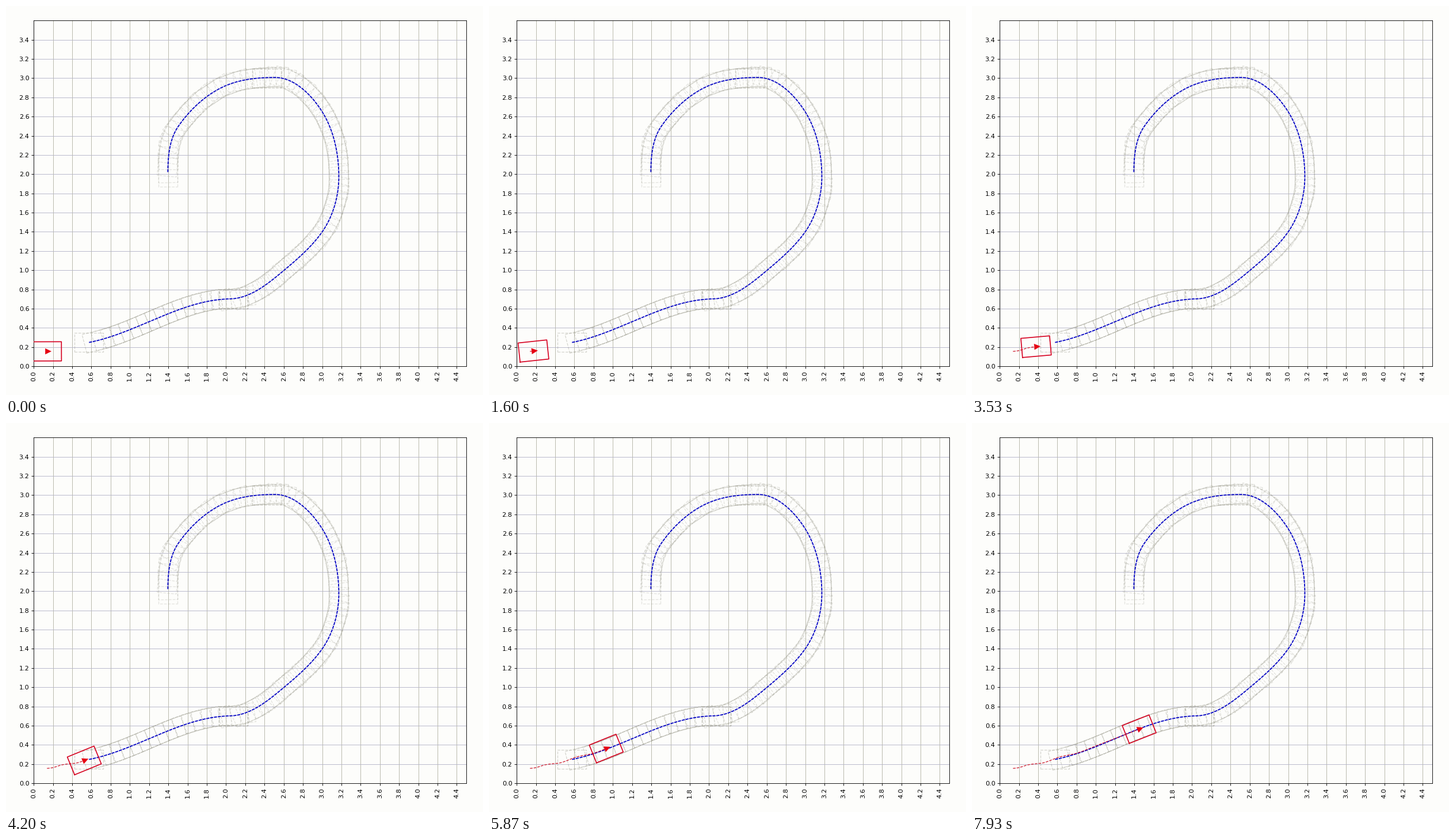
A matplotlib script for the animation above (8 s loop, 829 px wide and 676 px high).

```python
import numpy as np
import matplotlib.pyplot as plt
from matplotlib.animation import FuncAnimation
from matplotlib.collections import LineCollection

W, H, DPI = 829, 676, 80
FRAMES, LOOP_MS = 120, 8000
CAR_L, CAR_W = 0.3, 0.2
PAPER = "#fdfdfb"

# Key poses: x, y, heading in degrees
ROUTE = [(.575, .249, 11), (2.04, .702, 1), (2.6, .997, 40), (3.0, 1.4, 55),
         (3.173, 1.974, 90), (3.0, 2.65, 122), (2.51, 3.007, 180),
         (2.0, 2.923, 203), (1.505, 2.501, 235), (1.395, 2.022, 270)]
DRIVE = [(.138, .156, 0), (.177, .16, 5), (.288, .191, 13), (.41, .207, 3),
         (.6, .268, 19), (.742, .299, 11), (.94, .366, 22), (1.5, .584, 22)]


def curve(poses, n=80):
    """Hermite curve through the poses: x, y, heading and arc length."""
    t = np.linspace(0, 1, n)[:, None]
    parts = []
    for (x0, y0, a0), (x1, y1, a1) in zip(poses, poses[1:]):
        p, q = np.array([x0, y0]), np.array([x1, y1])
        reach = np.hypot(*(q - p))
        u, v = (reach * np.array([np.cos(a), np.sin(a)])
                for a in np.radians([a0, a1]))
        parts.append((1 + 2 * t) * (1 - t) ** 2 * p + t * (1 - t) ** 2 * u
                     + t * t * (3 - 2 * t) * q + t * t * (t - 1) * v)
    pts = np.vstack([parts[0][:1]] + [part[1:] for part in parts])
    arc = np.r_[0, np.cumsum(np.hypot(*np.diff(pts, axis=0).T))]
    dx, dy = np.gradient(pts, axis=0).T
    return pts[:, 0], pts[:, 1], np.unwrap(np.arctan2(dy, dx)), arc


def place(points, x, y, angle):
    c, s = np.cos(angle), np.sin(angle)
    return np.asarray(points) @ np.array([[c, s], [-s, c]]) + (x, y)


BOX = np.array([(-1, -1), (1, -1), (1, 1), (-1, 1), (-1, -1)]) * (CAR_L / 2, CAR_W / 2)
HEAD = [(-.018, -.03), (.044, 0), (-.018, .03)]

fig = plt.figure(figsize=(W / DPI, H / DPI), dpi=DPI, facecolor=PAPER)
ax = fig.add_axes([48.2 / W, 49.8 / H, 752 / W, 601 / H], facecolor=PAPER)
ax.set(xlim=(0, 4.5), ylim=(0, 3.6))
xt, yt = np.arange(23) * .2, np.arange(18) * .2
ax.set_xticks(xt, [f"{v:.1f}" for v in xt], rotation=90)
ax.set_yticks(yt, [f"{v:.1f}" for v in yt])
ax.tick_params(labelsize=10, labelfontfamily="DejaVu Sans")
ax.grid(axis="x", color="#b4b4a6", lw=.8)
ax.grid(axis="y", color="#b4b4c8", lw=.8)
ax.set_axisbelow(True)

rx, ry, ra, rs = curve(ROUTE)
rng = np.random.default_rng(4)


def footprints(stops, alpha, wobble, extra):
    """Faint car outlines along the route; overlaps darken."""
    angles = np.interp(stops, rs, ra) + rng.normal(0, np.radians(wobble), len(stops))
    poses = list(zip(np.interp(stops, rs, rx), np.interp(stops, rs, ry), angles))
    boxes = [place(BOX, *pose) for pose in poses + extra]
    ax.add_collection(LineCollection(boxes, colors="#8c8c7c", alpha=alpha,
                                     linewidths=1.15, linestyles="--", zorder=2))


bend = np.interp(2.08, rx[:160], rs[:160])
footprints(np.arange(.1, bend, .1), .34, 0,
           [(.575, .249, 0), (2.075, .7, 0), (2.075, .7, 0)])
footprints(np.arange(bend, rs[-1], .068), .22, 2.5,
           [(2.42, 3.0, 0), (2.42, 3.0, 0), (1.395, 2.022, np.pi / 2)])

ax.plot(rx, ry, color="#0000c4", lw=1.6, dashes=(3, .8), zorder=3)

trail, = ax.plot([], [], "--", color="#cc1428", lw=1.1, zorder=4)
body, = ax.plot([], [], color="#d60020", lw=1.5, zorder=5)
head = ax.fill([0, 0, 0], [0, 0, 0], color="#e60012", lw=.3, zorder=6)[0]

dx, dy, da, _ = curve(DRIVE)


def advance(i):
    """Gentle start that settles into a steady speed."""
    ramp = np.log1p(np.exp((np.array([i, 0]) - 42.5) / 12.2))
    return dx[0] + .213 * (ramp[0] - ramp[1])


def draw(i):
    x = advance(i)
    y, angle = np.interp(x, dx, dy), np.interp(x, dx, da)
    past = dx < x
    trail.set_data(np.r_[dx[past], x], np.r_[dy[past], y])
    body.set_data(*place(BOX, x, y, angle).T)
    head.set_xy(place(HEAD, x, y, angle))
    return trail, body, head


anim = FuncAnimation(fig, draw, frames=FRAMES, interval=LOOP_MS / FRAMES,
                     repeat=True, repeat_delay=0)
plt.show()
```
